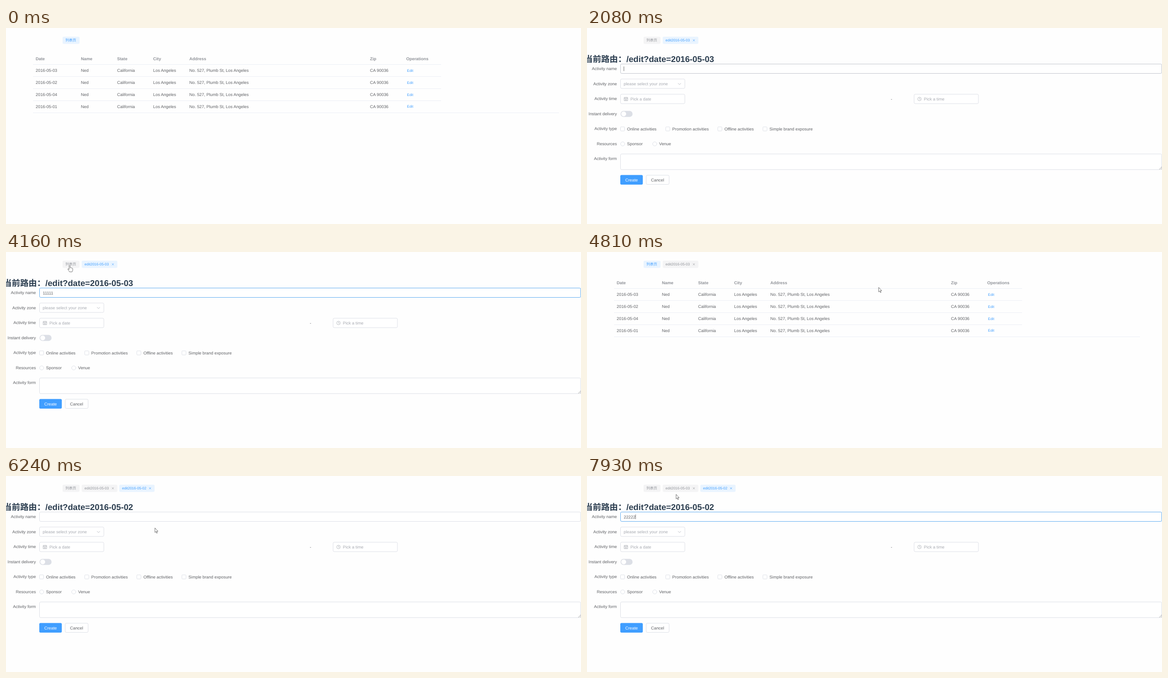
An HTML page for the animation above (8000 ms loop, 1278x438 px).

```html
<!DOCTYPE html>
<html lang="en">
<head>
<meta charset="utf-8">
<title>Tabbed edit pages</title>
<style>
  html, body { margin: 0; width: 100%; height: 100%; overflow: hidden; background: #fefefe; }
  svg { display: block; width: 1278px; height: 438px; }
  text { font: 9.36px "Liberation Sans", Arial, "Noto Sans CJK SC", "Noto Sans CJK", sans-serif; fill: #606266; text-rendering: geometricPrecision; }
  text.head { font-weight: bold; fill: #909399; }
  text.hint { fill: #a8abb2; }
  text.link { font-size: 8.03px; fill: #409eff; }
  text.label { text-anchor: end; }
  text.title { font-size: 18.72px; font-weight: bold; fill: #2c3e50; }
  text.white { fill: #fff; }
  .rule { stroke: #ebeef5; }
  .box { fill: #fff; stroke: #dcdfe6; }
  .icon { fill: none; stroke: #a8abb2; stroke-width: .8; }
  .tag rect { fill: #f4f4f5; }
  .tag text { font-size: 8.03px; fill: #909399; }
  .tag path { stroke: #909399; stroke-width: .8; }
  .tag.on rect { fill: #e9f4ff; }
  .tag.on text { fill: #409eff; }
  .tag.on path { stroke: #409eff; }
  #cursor path { fill: #fff; stroke: #4a4a4a; stroke-width: .8; stroke-linejoin: round; }
</style>
</head>
<body>
<svg id="stage" viewBox="0 0 1278 438"></svg>
<script>
const LOOP = 8000, STEP = 130, ROW = 26.76;

const text = (x, y, str, cls = '', id = '') =>
  `<text x="${x}" y="${y}" class="${cls}" id="${id}">${str}</text>`;
const box = (x, y, w, h, r = 2.7, id = '') =>
  `<rect x="${x}" y="${y}" width="${w}" height="${h}" rx="${r}" class="box" id="${id}"/>`;
const icon = d => `<path class="icon" d="${d}"/>`;
const rule = (y, right) => `<path class="rule" d="M60 ${y}H${right}"/>`;

function tag(id, x, w, str, closable) {
  const cx = x + w - 10;
  const close = closable ? `<path d="M${cx - 2} 25.5l4 4m0-4l-4 4"/>` : '';
  return `<g class="tag" id="${id}"><rect x="${x}" y="19.5" width="${w}" height="16" rx="2.7"/>` +
    text(x + 6.2, 30.1, str) + close + '</g>';
}

function listPage() {
  const cols = [66, 166.5, 247, 327, 407.5, 809, 889.5];
  const heads = ['Date', 'Name', 'State', 'City', 'Address', 'Zip', 'Operations'];
  const cells = ['Ned', 'California', 'Los Angeles', 'No. 527, Plumb St, Los Angeles', 'CA 90036'];
  let out = `<rect id="hover" x="60" width="907" height="${ROW}" fill="#f5f7fa"/>`;
  out += heads.map((h, i) => text(cols[i], 71.7, h, 'head')).join('') + rule(81.5, 967);
  ['03', '02', '04', '01'].forEach((day, r) => {
    const y = 98.3 + r * ROW;
    out += ['2016-05-' + day, ...cells].map((c, i) => text(cols[i], y, c)).join('');
    out += text(891.3, y - .3, 'Edit', 'link');
    out += rule(Math.round(81.5 + (r + 1) * ROW) + .5, r < 3 ? 967 : 1229);
  });
  return out;
}

function formPage() {
  const labels = ['Activity name', 'Activity zone', 'Activity time', 'Instant delivery',
    'Activity type', 'Resources', 'Activity form'];
  const checks = [[74.5, 'Online activities'], [175, 'Promotion activities'],
    [290.8, 'Offline activities'], [391, 'Simple brand exposure']];
  const radios = [[79.3, 'Sponsor'], [150.5, 'Venue']];
  return text(-6, 75.7, '', 'title', 'title') +
    labels.map((l, i) => text(66.4, 94.4 + i * 33.5, l, 'label')).join('') +
    box(74.5, 80.5, 1203, 21, 2.7, 'field') + text(81.7, 94.5, '', '', 'value') +
    '<path id="caret" stroke="#444" stroke-width=".8"/>' +
    box(74.5, 114, 143, 21) + text(81.5, 127.9, 'please select your zone', 'hint') + icon('M202.3 123.4l3.3 3.2 3.3-3.2') +
    box(74.5, 148, 143, 21) + text(96.5, 161.7, 'Pick a date', 'hint') +
    icon('M82.5 155.3h8v7.2h-8zM82.5 157.5h8M84.7 154v2M88.3 154v2M84.2 159.3h4.6M84.2 161h4.6') +
    text(675.3, 161.7, '-') +
    box(727, 148, 143, 21) + text(748.7, 161.7, 'Pick a time', 'hint') +
    icon('M743 158.6a4 4 0 1 0-8 0a4 4 0 1 0 8 0M739 156v3h2.2') +
    '<rect x="74.5" y="185.3" width="26.8" height="13.4" rx="6.7" fill="#dcdfe6"/><circle cx="81.6" cy="192" r="5.4" fill="#fff"/>' +
    checks.map(([x, s]) => box(x, 221, 9, 9, 1.3) + text(x + 14.6, 228.6, s)).join('') +
    radios.map(([x, s]) => `<circle class="box" cx="${x}" cy="259" r="4.5"/>` + text(x + 9.7, 262.1, s)).join('') +
    box(74.5, 281.5, 1203, 35) + '<path d="M1272 316l6-6M1275.500 316l2.500-2.500" stroke="#777" stroke-width=".7"/>' +
    '<rect x="74" y="328.500" width="50" height="21.400" rx="2.700" fill="#409eff"/>' + text(85, 342.500, 'Create', 'white') +
    box(131.5, 329, 51, 20.5) + text(142.2, 342.5, 'Cancel');
}

const shapes = {
  arrow: 'M0 0V10.2L2.3 8.1L3.9 11.8L5.4 11.1L3.8 7.5H6.8Z',
  hand: 'M-1.2 9V1.2Q0-.8 1.2 1.2V5.2Q2.4 4.2 3.2 5.6Q4.6 4.8 5.2 6.2Q6.8 5.8 6.8 7.6V10.5Q6.6 12.4 5.4 14.4H-.2Q-2 11.5-3.8 9Q-4.4 7.2-2.6 7.6Z',
  beam: 'M-1.5-5h3M0-5V5M-1.5 5h3'
};

document.getElementById('stage').innerHTML =
  tag('tagList', 125.8, 37.6, '列表页') +
  tag('tagA', 168.3, 79.2, 'edit2016-05-03', true) +
  tag('tagB', 251.8, 78.4, 'edit2016-05-02', true) +
  `<g id="list">${listPage()}</g><g id="form">${formPage()}</g>` +
  '<g id="progress"><rect id="bar" height="1.4" fill="#29d"/>' +
  '<path id="spin" d="M1258.500 18.500A5 5 0 0 1 1265.500 11.500" fill="none" stroke="#3a8fdc" stroke-width="1.400"/></g>' +
  '<g id="cursor"><path id="shape"/></g>';

const el = {};
document.querySelectorAll('[id]').forEach(n => { if (n.id) el[n.id] = n; });
const show = (node, on) => { node.style.display = on ? '' : 'none'; };

// Pointer tracks: [time, x, y]; the pointer is hidden between tracks.
const tracks = [
  [[130, 1010, 420], [910, 898.5, 97], [1170, 898.5, 97], [1820, 110, 93], [2080, 84, 91]],
  [[3770, 110, 84], [4160, 141.5, 30], [4550, 141.5, 30], [5070, 1155, 128], [5590, 895.5, 124],
   [5850, 895.5, 124], [6240, 331, 116], [6500, 140, 92]],
  [[7410, 235, 88], [7930, 198, 41], [LOOP, 198, 41]]
];
const navs = [1040, 4420, 5850];
const pageAt = t => t < 1040 ? 'list' : t < 4420 ? 'a' : t < 5850 ? 'list' : 'b';

function pointerAt(t) {
  for (const track of tracks) {
    const i = track.findIndex(p => p[0] > t);
    if (i < 1) continue;
    const [t0, x0, y0] = track[i - 1], [t1, x1, y1] = track[i];
    const u = (t - t0) / (t1 - t0), k = u * u * (3 - 2 * u);
    return { x: x0 + (x1 - x0) * k, y: y0 + (y1 - y0) * k };
  }
  return null;
}

function pointerShape(p, t) {
  const overTag = p.x > 126 && p.x < 163 && p.y > 19 && p.y < 36;
  if (overTag) return 'hand';
  if (pageAt(t - STEP) === 'list') {
    const offset = (p.y - 81.5) % ROW;
    const overEdit = p.x > 889 && p.x < 908 && p.y > 82 && p.y < 189 && offset > 4 && offset < 23;
    return overEdit ? 'hand' : 'arrow';
  }
  return p.x > 74 && p.y > 80 && p.y < 102 ? 'beam' : 'arrow';
}

function drawForm(t, page, p) {
  const second = page === 'b';
  const focus = second ? 6500 : 2080, firstKey = second ? 6760 : 3120;
  const typed = Math.max(0, Math.min(5, Math.floor((t - firstKey) / STEP) + 1));
  const over = p && p.x > 74 && p.y > 80 && p.y < 102;
  el.title.textContent = '当前路由：/edit?date=2016-05-' + (second ? '02' : '03');
  el.value.textContent = (second ? '2' : '1').repeat(typed);
  el.field.style.stroke = t >= focus + STEP ? '#5ba9ef' : over || t >= focus ? '#c0c4cc' : '';
  show(el.caret, t >= focus && (second || t < 3770));
  el.caret.setAttribute('d', `M${82 + typed * 5.2} 86v10.300`);
}

function drawProgress(t) {
  const start = navs.find(n => t >= n && t < n + 3 * STEP);
  show(el.progress, start !== undefined);
  if (start === undefined) return;
  const age = t - start;
  el.bar.setAttribute('width', 1278 * Math.min(1, age / 260));
  el.progress.style.opacity = age < 260 ? 1 : .5;
  el.spin.setAttribute('transform', `rotate(${age / 400 * 360} 1262 15)`);
}

function draw(now) {
  const t = Math.floor(now % LOOP / STEP) * STEP;
  const page = pageAt(t), p = pointerAt(t);
  // Tags follow the route one step late.
  const active = pageAt(t - STEP);
  el.tagList.classList.toggle('on', page === 'list' && active === 'list');
  el.tagA.classList.toggle('on', page === 'a' || active === 'a');
  el.tagB.classList.toggle('on', active === 'b');
  show(el.tagA, t >= 1170);
  show(el.tagB, t >= 5980);
  show(el.list, page === 'list');
  show(el.form, page !== 'list');

  if (page === 'list') {
    const row = p ? Math.floor((p.y - 81.5) / ROW) : -1;
    show(el.hover, row >= 0 && row < 4 && p.x > 60 && p.x < 967);
    el.hover.setAttribute('y', 81.5 + row * ROW);
  } else drawForm(t, page, p);

  drawProgress(t);
  show(el.cursor, p);
  if (p) {
    el.cursor.setAttribute('transform', `translate(${p.x} ${p.y})`);
    el.shape.setAttribute('d', shapes[pointerShape(p, t)]);
  }
}

const begin = performance.now();
function tick() {
  draw(performance.now() - begin);
  requestAnimationFrame(tick);
}
tick();
</script>
</body>
</html>
```
